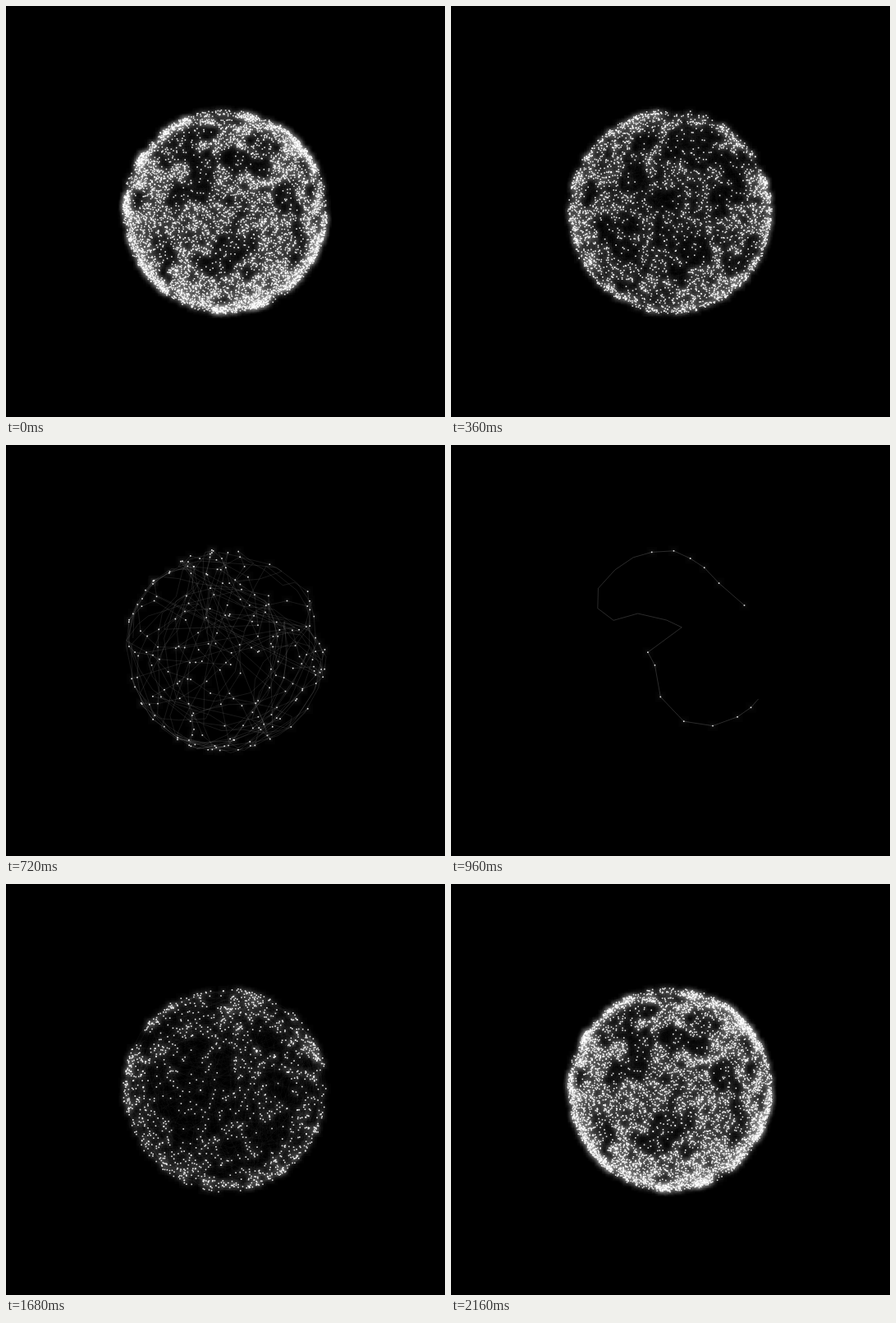
These frames come from a looping animation (535x500 px, 2190 ms). An HTML page with a canvas:

```html
<!DOCTYPE html>
<html>
<head>
<meta charset="utf-8">
<style>
html, body { margin: 0; width: 100%; height: 100%; overflow: hidden; background: #000; }
canvas { display: block; }
</style>
</head>
<body>
<canvas id="stage" width="535" height="500"></canvas>
<script>
const ctx = document.getElementById('stage').getContext('2d');
const LOOP = 2190, STEP = 30, EMPTY = 1100;
const CX = 267, CY = 250, R = 123, TOTAL = 12000;

let seed = 7;
function rand() {
  seed = (seed + 0x6D2B79F5) | 0;
  let a = Math.imul(seed ^ seed >>> 15, 1 | seed);
  a = a + Math.imul(a ^ a >>> 7, 61 | a) ^ a;
  return ((a ^ a >>> 14) >>> 0) / 4294967296;
}

const dot = (a, b) => a[0] * b[0] + a[1] * b[1] + a[2] * b[2];
const add = (a, b, k) => a.map((v, i) => v + b[i] * k);
const scale = (a, k) => a.map(v => v * k);
const unit = a => scale(a, 1 / Math.hypot(...a));

function randomUnit() {
  const z = rand() * 2 - 1, a = rand() * 2 * Math.PI, r = Math.sqrt(1 - z * z);
  return [r * Math.cos(a), r * Math.sin(a), z];
}

// A chain wanders over the sphere, mostly avoiding small round holes
function makeChain() {
  const holes = Array.from({ length: 90 }, () => [randomUnit(), Math.cos(0.08 + rand() * 0.1)]);
  const blocked = p => rand() < 0.85 && holes.some(([h, c]) => dot(h, p) > c);
  const chain = [];
  let last = randomUnit(), heading = randomUnit();
  while (chain.length < TOTAL) {
    const jump = rand() < 0.06;
    let next, tries = 0;
    do {
      next = jump || tries > 8
        ? randomUnit()
        : unit(add(last, unit(add(heading, randomUnit(), 0.5 + tries * 0.2)), 0.2 + rand() * 0.25));
      tries++;
    } while (blocked(next));
    heading = unit(add(next, last, -1));
    last = next;
    chain.push(scale(next, 0.97 + rand() * 0.045));
  }
  return chain;
}
const chain = makeChain();

function countAt(t) {
  const s = Math.sin(Math.PI * (t - EMPTY) / LOOP) ** 2;
  return Math.min(TOTAL, Math.round(TOTAL * s ** 2.5 + Math.min(22, 465 * s)));
}

function project([x, y, z], a) {
  const c = Math.cos(a), s = Math.sin(a);
  return [CX + (x * c + z * s) * R, CY + y * R, z * c - x * s];
}

function drawSquares(pts, size, alpha) {
  ctx.fillStyle = `rgba(255,255,255,${alpha})`;
  for (const [x, y] of pts) ctx.fillRect(x - size / 2, y - size / 2, size, size);
}

// Short runs let crossing threads build up into haze
function drawThreads(pts) {
  const run = 40, n = pts.length;
  ctx.lineWidth = 1;
  ctx.strokeStyle = `rgba(255,255,255,${Math.min(0.17, 45 / n + 0.004)})`;
  for (let i = 0; i < n - 1; i += run) {
    ctx.beginPath();
    for (const [x, y] of pts.slice(i, i + run + 1)) ctx.lineTo(x, y);
    ctx.stroke();
  }
}

function draw(t) {
  const a = 2 * Math.PI * t / LOOP;
  const pts = chain.slice(0, countAt(t)).map(p => project(p, a));
  const front = pts.filter(p => p[2] > 0);
  ctx.fillStyle = '#000';
  ctx.fillRect(0, 0, 535, 500);
  drawThreads(pts);
  drawSquares(front, 13, 0.01);
  drawSquares(front, 7, 0.02);
  drawSquares(front, 1.6, 0.9);
}

let shown = -1;
function tick() {
  const t = Math.floor(performance.now() % LOOP / STEP) * STEP;
  if (t !== shown) draw(shown = t);
  requestAnimationFrame(tick);
}
tick();
</script>
</body>
</html>
```
